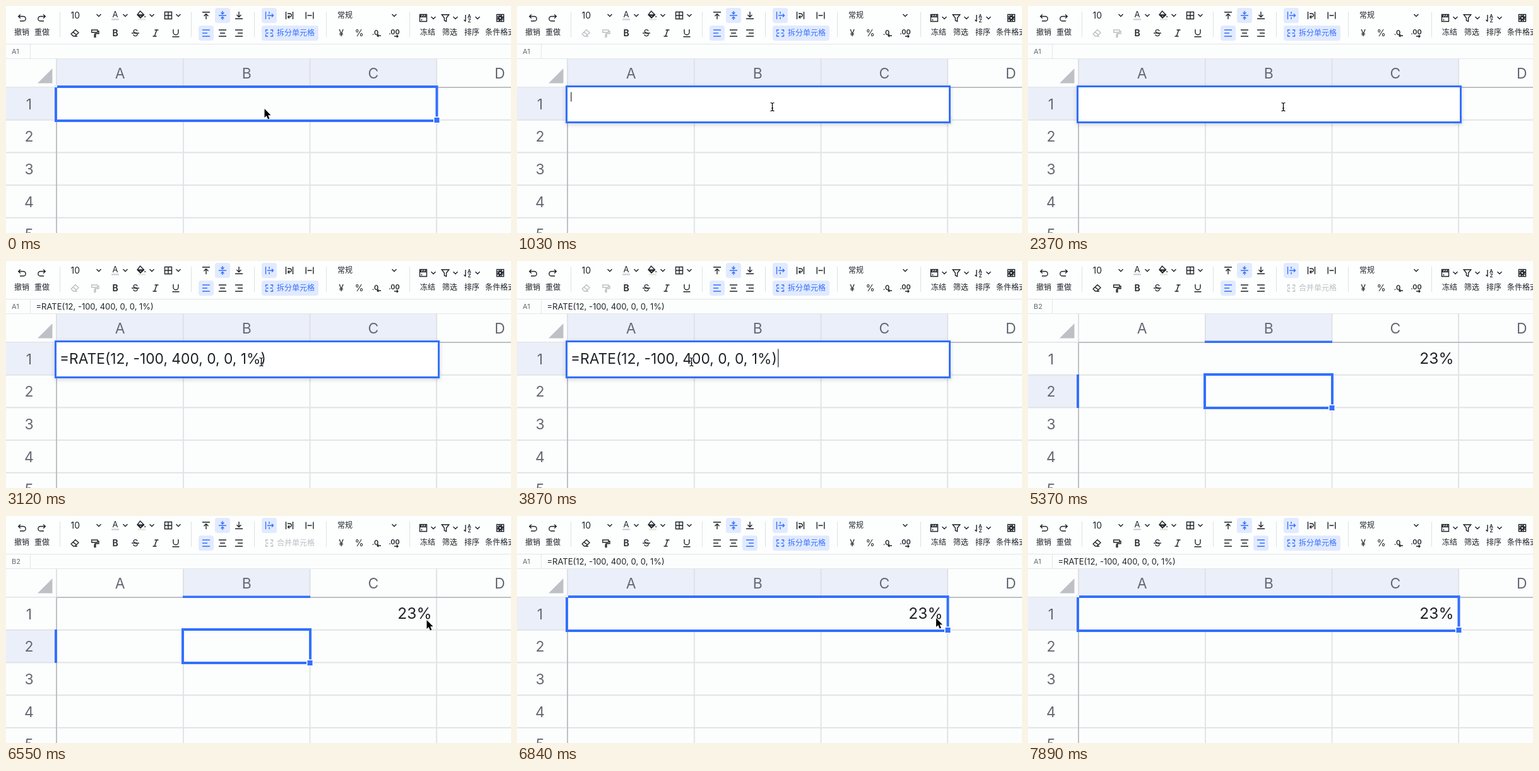
An HTML page for the animation above (8.19 s loop, 800 by 360 pixels).

```html
<!DOCTYPE html>
<html lang="zh">
<head>
<meta charset="utf-8">
<style>
html, body { margin: 0; width: 100%; height: 100%; overflow: hidden; background: #fcfefd }
svg { display: block; width: 800px; height: 360px; font: 12px Inter, "Noto Sans CJK SC", "Noto Sans CJK", sans-serif }
.ic { fill: none; stroke: #1f2329; stroke-width: 1.4 }
.ic.on { stroke: #3370ff }
.ic.off { stroke: #bbbfc4 }
text { fill: #1f2329 }
.head { font-size: 23px; fill: #646a73 }
.mid { text-anchor: middle }
</style>
</head>
<body>
<svg id="stage" viewBox="0 0 800 360"></svg>
<script>
const BLUE = '#3370ff', HEAD = '#ebeff9', PALE = '#e1eaff', GRID = '#e1e3e6', EDGE = '#bfc0c6';
const FORMULA = '=RATE(12, -100, 400, 0, 0, 1%)';
const LOOP = 8190;
const colX = i => 80.3 + i * 200.6, rowY = i => 129 + i * 51.7;

const box = (x, y, w, h, fill, more = '') =>
  `<rect x="${x}" y="${y}" width="${w}" height="${h}" fill="${fill}" ${more}/>`;
const text = (x, y, s, more = '') => `<text x="${x}" y="${y}" ${more}>${s}</text>`;
const mid = (x, y, s, size = 12, more = '') => text(x, y, s, `class="mid" font-size="${size}" ${more}`);
const icon = (x, y, d, cls = '', flip = '1') =>
  `<path class="ic ${cls}" transform="translate(${x} ${y}) scale(${flip})" d="${d}"/>`;
const button = (x, y, w = 24) => box(x, y, w, 24, PALE, 'rx="4"');
const group = (id, s) => `<g id="${id}">${s}</g>`;

const UNDO = 'M-5-2.5H2.5a3.6 3.6 0 0 1 0 7.3H-3M-2.2-5.6l-3.1 3.1 3.1 3.1';
const TOP = 'M-6-5.3H6M0 6V-2M-3.5 1L0-2.5 3.5 1';
const ERASER = 'M-5.8 1.2L1-5.2 6-.8 .3 4.8H-2.6ZM-2.8-1.6L2.6 2.8M0 5H4';
const ROLLER = 'M-5.3-5H4V-1.2H-5.3ZM4-3H6V.8H0V3M-.9 2.8h1.8v3.4h-1.8z';
const MERGE = 'M-2-5H-5.5V-2M2-5H5.5V-2M-2 5H-5.5V2M2 5H5.5V2M-5.5 0H-1.5M5.5 0H1.5';
const alignPath = [[-6, 2], [-4, 4], [-2, 6]].map(([a, b]) => `M-6-5H6M${a} 0H${b}M-6 5H6`);

function toolbar() {
  let s = box(0, 0, 800, 60, '#fdfefe');
  for (const x of [85, 293, 393, 507, 639]) s += box(x, 9, 1, 40, '#dee0e3');
  s += icon(25, 19, UNDO) + icon(57, 19, UNDO, '', '-1 1');
  for (const [x, s1] of [[25, '撤销'], [57, '重做'], [668, '冻结'], [703, '筛选'], [738, '排序'], [783, '条件格式']])
    s += mid(x, 46, s1);
  for (const x of [147, 189, 231, 273, 615]) s += icon(x, 15, 'M-3.5-2L0 1.5 3.5-2');
  for (const x of [677, 712, 747]) s += icon(x, 19, 'M-3.5-2L0 1.5 3.5-2');

  s += text(102.5, 20, '10', 'font-size="14"') + mid(173, 18, 'A', 13) + box(167, 20, 12, 2.5, '#d0d3da');
  s += icon(214, 14, 'M-1.5-6L4.5 0-1 5-6 0ZM-6 0H4.5') + icon(214, 14, 'M-4 1H3L-1 4ZM6.2 2v2')
    + box(209, 20, 12, 2.5, '#e3e8da');
  s += icon(257, 15, 'M-5.5-5.5h11v11h-11zM0-5.5v11M-5.5 0h11');
  s += mid(173, 48, 'B', 14, 'font-weight="600"') + mid(205, 48, 'S', 14) + icon(205, 43, 'M-6 0H6');
  s += icon(237, 43, 'M-1.5-5H4.5M-4.5 5H1.5M1.7-5L-1.7 5') + icon(269, 43, 'M-4-6V-1.3a4 4 0 0 0 8 0V-6M-5.5 5.8H5.5');

  s += button(331, 3) + button(405, 3);
  s += icon(317, 15, TOP) + icon(369, 15, TOP, '', '1 -1');
  s += icon(343, 15, 'M-6 0H6M0-7V-2.5M-2.5-4.7L0-2.2 2.5-4.7M0 7V2.5M-2.5 4.7L0 2.2 2.5 4.7', 'on');
  s += icon(417, 15, 'M-5.5-6V6M0-6V-2.5M0 2.5V6M-3 0H6M4-2.5L6.5 0 4 2.5', 'on');
  s += icon(449, 15, 'M-5.5-6V6M5.5-6V6M-3-3H.5a2.7 2.7 0 0 1 0 5.4H-2M0 0L-2.4 2.4 0 4.8');
  s += icon(481, 15, 'M-5.8-5.5V5.5M5.8-5.5V5.5M-3.5 0H3.5');

  s += text(525, 19, '常规') + mid(531, 48, '¥', 14) + mid(559.5, 48, '%', 14);
  s += mid(585, 46, '.0', 11, 'font-weight="600"') + icon(590, 47, 'M4 0H-2M0-2L-2 0 0 2');
  s += mid(615, 45, '.00', 11, 'font-weight="600"') + icon(619, 48, 'M-4 0H2M0-2L2 0 0 2');

  s += icon(661, 19, 'M-5.5-5.5h11v11h-11zM-5.5-1.8h11M-2.5-5.5l-2 3M1-5.5l-2 3M4.5-5.5l-2 3M-2.5 2v2');
  s += icon(696, 19, 'M-5.7-5.3H5.7L1.6 0V5.5L-1.6 4V0Z');
  s += icon(728, 19, 'M0-5V5.5M-2.5 3L0 5.5') + mid(734, 19, 'A', 8, 'font-weight="600"') + mid(734, 26, 'Z', 8, 'font-weight="600"');
  s += icon(783, 19, 'M-5.5-5.5h11v11h-11zM-5.5-1.8h11M-5.5 1.8h11M-1.8-5.5v11M1.8-5.5v11M-5 2L2-5M-2 5L5-2');
  return s;
}

function sheet() {
  let s = box(0, 60, 800, 1, '#e3e5e7') + box(0, 83, 800, 1, '#e3e5e7') + box(38, 61, 1, 22, '#e3e5e7');
  s += box(0, 84, 800, 276, '#fcfefd') + '<g id="shade"></g>';
  s += '<path d="M50 122.5H73.5V99Z" fill="#bfc0c5"/>';
  for (let i = 1; i < 5; i++) s += box(0, rowY(i) - 1, 800, 2, GRID);
  for (let i = 1; i < 4; i++) {
    s += box(colX(i) - 1, 84, 2, 44, '#dfe1e6');
    const y = i < 3 ? rowY(1) : 130;
    s += box(colX(i) - 1, y, 2, 360 - y, GRID);
  }
  s += box(79, 84, 2, 44, '#dfe1e6') + box(79, 128, 2, 232, EDGE) + box(0, 128, 80, 1.5, '#dfe1e6') + box(80, 128, 720, 2, EDGE);
  [...'ABCD'].forEach((c, i) => s += text(colX(i + .5), 115, c, 'class="head mid"'));
  for (let i = 0; i < 5; i++) s += text(36.5, rowY(i) + 34.5, i + 1, 'class="head mid"');
  return s;
}

const frame = (x, y, w, h) => box(x, y, w, h, 'none', `stroke="${BLUE}" stroke-width="4"`);
const handle = (x, y) => box(x - 5.5, y - 5.5, 11, 11, '#fff') + box(x - 4, y - 4, 8, 8, BLUE);
const mergedShade = box(81, 84, 601, 44, HEAD) + box(0, 130, 79, 50, HEAD);
const cellShade = box(281, 84, 200, 44, HEAD) + box(0, 181, 79, 51, HEAD);

const $ = id => document.getElementById(id);
$('stage').innerHTML = toolbar() + group('tools', '') + sheet()
  + group('merged', box(81, 130, 600, 50, '#fcfefd') + frame(79, 128, 603.5, 54) + box(76, 125, 5, 4, HEAD) + handle(682.5, 181))
  + group('cell', box(280, 126.5, 202, 3.5, BLUE) + box(77, 180, 4, 53, BLUE) + frame(280, 180, 202, 53) + handle(481.5, 233))
  + group('editor', box(677, 176, 11, 11, '#fff', 'stroke="#dde3f0" stroke-width=".8"')
    + box(78.5, 127.5, 607, 57, '#fff', `stroke="${BLUE}" stroke-width="3" style="filter:drop-shadow(0 2px 3px #1f232933)"`))
  + group('typed', text(85, 163, FORMULA, 'font-size="22.8"'))
  + group('bar', text(47.5, 77, FORMULA, 'font-size="13"'))
  + group('result', text(674.5, 163, '23%', 'font-size="24.5" text-anchor="end"'))
  + box(0, 0, 1.2, 15, '#1f2329', 'id="caret"')
  + text(9, 76, '', 'id="name" font-size="11" style="fill:#646a73"')
  + group('arrow', '<path d="M0 0V14l3.2-3 2.3 5.4 2.4-1-2.3-5.2H10Z" fill="#000" stroke="#fff" stroke-width="1.2" paint-order="stroke"/>')
  + group('beam', ['stroke="#fff" stroke-width="3"', 'stroke="#000" stroke-width="1.2"'].map(st =>
    `<path d="M-3-6.5Q0-6.5 0-4.5Q0-6.5 3-6.5M0-5V5M-3 6.5Q0 6.5 0 4.5Q0 6.5 3 6.5M-1.5 2H1.5" fill="none" ${st}/>`).join(''));

// Pointer stops: start time, shape, x, y
const pointer = [
  [0, 'arrow', 409.5, 163], [440, 'arrow', 409, 196], [590, 'arrow', 405, 178], [740, 'arrow', 403, 160],
  [1030, 'beam', 404.5, 160], [3570, 'beam', 370, 174], [3720, 'beam', 296, 190], [3870, 'beam', 276.5, 160],
  [4020, 'beam', 270, 157], [4320, ''],
  [6260, 'arrow', 705, 263], [6400, 'arrow', 688, 208], [6550, 'arrow', 666.5, 165], [6700, 'arrow', 664, 162],
  [7590, 'arrow', 698, 250], [7740, 'arrow', 771, 346], [7890, '']
];
const blinks = [1030, 1480, 1930, 2370, 2520, 3120, 3570, 4170, 4620, 5070];
const show = (id, on) => $(id).style.display = on ? '' : 'none';

function setTools(editing, single, align) {
  let s = icon(109, 43, ERASER, editing ? 'off' : '') + icon(141, 43, ROLLER, editing ? 'off' : '');
  s += button(305 + align * 26, 31);
  alignPath.forEach((d, i) => s += icon(317 + i * 26, 43, d, i === align ? 'on' : ''));
  if (!single) s += button(405, 31, 90);
  s += icon(417, 43, MERGE, single ? 'off' : 'on');
  s += text(429, 47, single ? '合并单元格' : '拆分单元格', `style="fill:${single ? '#bbbfc4' : BLUE}"`);
  $('tools').innerHTML = s;
}

let last;
function draw(now) {
  const t = now % LOOP;
  const editing = t >= 1030 && t < 5370, single = t >= 5370 && t < 6840, done = t >= 6840;
  const typed = editing && t >= 2520;
  const key = [editing, single, done].join();
  if (key !== last) {
    last = key;
    setTools(editing, single, done ? 2 : 0);
    $('shade').innerHTML = single ? cellShade : mergedShade;
    $('name').textContent = single ? 'B2' : 'A1';
  }
  show('merged', !editing && !single);
  show('cell', single);
  show('editor', editing);
  show('typed', typed);
  show('bar', typed || done);
  show('result', single || done);
  show('caret', editing && blinks.filter(b => b <= t).length % 2);
  $('caret').setAttribute('transform', typed ? 'translate(413.2 139.5) scale(1 1.93)' : 'translate(85.2 136.5)');
  const [, shape, x, y] = pointer.findLast(p => p[0] <= t);
  show('arrow', shape === 'arrow');
  show('beam', shape === 'beam');
  if (shape) $(shape).setAttribute('transform', `translate(${x} ${y})`);
  requestAnimationFrame(() => draw(performance.now()));
}
draw(performance.now());
</script>
</body>
</html>
```
